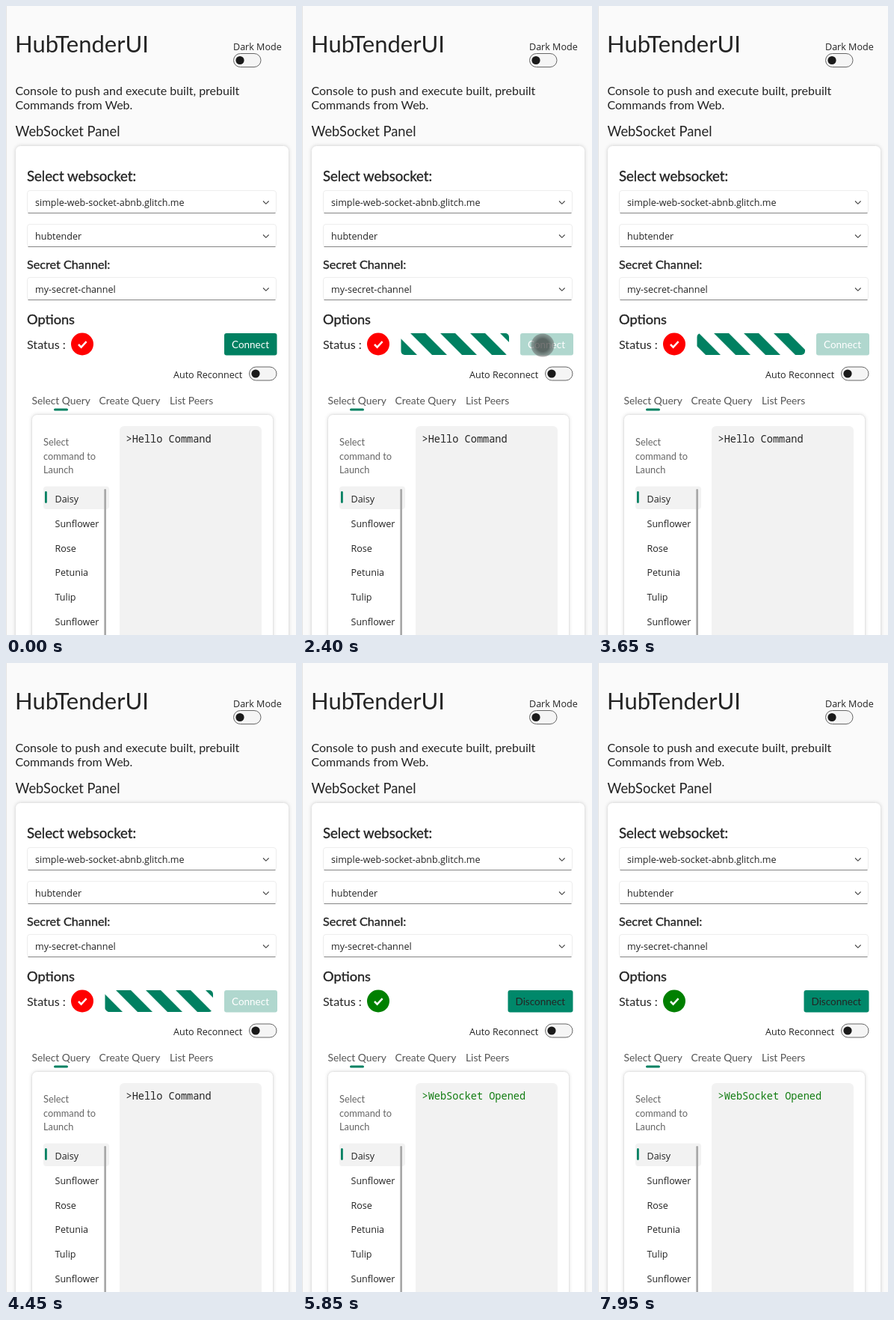
Write an HTML page that moves like this. It is 388x840 px and loops after 8000 ms.

```html
<!DOCTYPE html>
<html lang="en">
<head>
<meta charset="utf-8">
<title>WebSocket panel</title>
<style>
  html, body { margin: 0; width: 100%; height: 100%; overflow: hidden; background: #fafafa; }
  svg { display: block; width: 388px; height: 840px; }
  text { font-family: Lato, sans-serif; fill: #242424; white-space: pre; }
  .ui { font: 12.55px "Open Sans", sans-serif; }
  .mono { font: 13.6px "Noto Sans Mono", monospace; }
  .semi { stroke: #242424; stroke-width: .35px; }
  .tab { font-size: 13.8px; fill: #555; }
  .hint { font-size: 12.8px; fill: #666; }
  .button { font-size: 13.5px; }
  .card { fill: #fff; stroke: #e4e4e4; filter: drop-shadow(0 0 2px rgba(0, 0, 0, .13)); }
  .accent { fill: #008061; }

  /* Hard state changes: idle, connecting, open */
  .idle, .busy, .open, .closed { animation: 8s step-end infinite; }
  .idle { animation-name: idle; }
  .busy { animation-name: busy; }
  .open { animation-name: open; }
  .closed { animation-name: closed; }
  @keyframes idle { 0% { visibility: visible } 24.375%, 100% { visibility: hidden } }
  @keyframes busy { 0% { visibility: hidden } 24.375% { visibility: visible } 64.3%, 100% { visibility: hidden } }
  @keyframes open { 0% { visibility: hidden } 64.3%, 100% { visibility: visible } }
  @keyframes closed { 0% { visibility: visible } 64.3%, 100% { visibility: hidden } }

  .stripes { animation: slide 1s linear infinite; }
  @keyframes slide { to { transform: translateX(40px) } }

  .pointer { animation: roam 8s ease-in-out infinite; }
  @keyframes roam {
    0%, 4.5% { transform: translate(406px, 490px) }
    10.5% { transform: translate(286px, 452px) }
    12.5% { transform: translate(265px, 450px) }
    14.5% { transform: translate(265px, 449px) }
    18.125% { transform: translate(291px, 449px) }
    21.5%, 33% { transform: translate(322px, 453px) }
    38% { transform: translate(406px, 464px) }
    58% { transform: translate(406px, 508px) }
    61.5% { transform: translate(380px, 512px) }
    64.375% { transform: translate(386px, 512px) }
    67%, 100% { transform: translate(406px, 512px) }
  }
</style>
</head>
<body>
<svg viewBox="0 0 388 840">
  <defs>
    <pattern id="bars" width="40" height="29" patternUnits="userSpaceOnUse">
      <path class="accent" d="M0 0h20l29 29h-20zM-40 0h20l29 29h-20z"/>
    </pattern>
    <clipPath id="track"><rect x="132.5" y="437" width="144.5" height="29" rx="5"/></clipPath>
    <radialGradient id="touch">
      <stop offset=".55" stop-color="#323232" stop-opacity=".68"/>
      <stop offset=".75" stop-color="#4a4a4a" stop-opacity=".6"/>
      <stop offset="1" stop-color="#666" stop-opacity=".5"/>
    </radialGradient>
    <g id="toggle">
      <rect x=".5" y=".5" width="36.5" height="18" rx="9" fill="#f5f5f5" stroke="#666"/>
      <circle cx="9" cy="9.5" r="5.6" fill="#1a1a1a"/>
    </g>
  </defs>

  <rect width="388" height="840" fill="#fafafa"/>
  <rect width="1" height="840" fill="#e4e4e4"/>
  <text x="12" y="62" font-size="31">HubTenderUI</text>
  <text class="ui" x="304" y="59">Dark Mode</text>
  <use href="#toggle" x="304" y="63"/>
  <text x="12.5" y="119" font-size="16">Console to push and execute built, prebuilt</text>
  <text x="12.5" y="138" font-size="16">Commands from Web.</text>
  <text x="12.5" y="174" font-size="18.3">WebSocket Panel</text>

  <rect class="card" x="12.5" y="186.5" width="366" height="700" rx="7"/>
  <text class="semi" x="28" y="234" font-size="18.6">Select websocket:</text>
  <text class="semi" x="28" y="351" font-size="16.2">Secret Channel:</text>
  <g id="selects"></g>

  <text class="semi" x="28" y="425" font-size="18.2">Options</text>
  <text x="28" y="458" font-size="16.1">Status :</text>
  <circle class="closed" cx="102" cy="451.5" r="15" fill="#f00"/>
  <circle class="open" cx="102" cy="451.5" r="15" fill="#008000"/>
  <path d="M97 452l3.6 3.6 7-7.4" fill="none" stroke="#fff" stroke-width="2.5"/>

  <g class="busy">
    <g clip-path="url(#track)">
      <rect x="132" y="437" width="146" height="29" fill="#fff"/>
      <g transform="translate(129 437)"><rect class="stripes" x="-80" width="280" height="29" fill="url(#bars)"/></g>
    </g>
    <rect x="292" y="437" width="71" height="29.5" rx="3" fill="#b0d7ce"/>
  </g>
  <rect class="idle accent" x="292" y="437" width="70.5" height="29.5" rx="3"/>
  <text class="button closed" x="302" y="457" style="fill:#fff">Connect</text>
  <g class="open">
    <rect x="275.5" y="437" width="87" height="29.5" rx="3" fill="#00886a"/>
    <text class="button" x="285.5" y="457">Disconnect</text>
  </g>
  <text class="ui" x="224" y="497">Auto Reconnect</text>
  <use href="#toggle" x="325" y="481.5"/>

  <text class="tab" x="34.5" y="532">Select Query</text>
  <text class="tab" x="124.5" y="532">Create Query</text>
  <text class="tab" x="219" y="532">List Peers</text>
  <rect class="accent" x="64" y="537.5" width="19" height="3" rx="1.5"/>

  <rect class="card" x="34.5" y="545.5" width="323" height="340" rx="7"/>
  <text class="hint" x="50" y="587">Select</text>
  <text class="hint" x="50" y="605.5">command to</text>
  <text class="hint" x="50" y="624">Launch</text>
  <rect x="50" y="641.5" width="88" height="30.5" rx="4" fill="#f2f2f2"/>
  <rect class="accent" x="52" y="648" width="2.8" height="16" rx="1.4"/>
  <g id="commands"></g>
  <rect x="131.3" y="645" width="2.7" height="220" rx="1.3" fill="#a8a8a8"/>

  <rect x="152" y="561" width="190" height="320" rx="6" fill="#f2f2f2"/>
  <text class="mono closed" x="160.5" y="583">&gt;Hello Command</text>
  <text class="mono open" x="160.5" y="583" style="fill:#107c10">&gt;WebSocket Opened</text>

  <circle class="pointer" r="15.5" fill="url(#touch)"/>
</svg>
<script>
  const fill = (id, items, draw) => {
    document.getElementById(id).innerHTML = items.map(draw).join('');
  };
  const selects = [
    [247, 'simple-web-socket-abnb.glitch.me'],
    [292, 'hubtender'],
    [363, 'my-secret-channel'],
  ];
  fill('selects', selects, ([y, label]) => `
    <rect x="28.5" y="${y - .5}" width="333" height="30" rx="3.5" fill="#fff" stroke="#ededed"/>
    <path d="M29.5 ${y + 29.5}h331" stroke="#858585"/>
    <text class="ui" x="39" y="${y + 19.7}">${label}</text>
    <path d="M344 ${y + 13.5}l3.8 3.8 3.8-3.8" fill="none" stroke="#424242" stroke-width="1.1"/>`);

  const commands = ['Daisy', 'Sunflower', 'Rose', 'Petunia', 'Tulip', 'Sunflower'];
  fill('commands', commands, (name, i) =>
    `<text class="ui" x="65.5" y="${663 + Math.round(i * 32.8)}">${name}</text>`);
</script>
</body>
</html>
```
